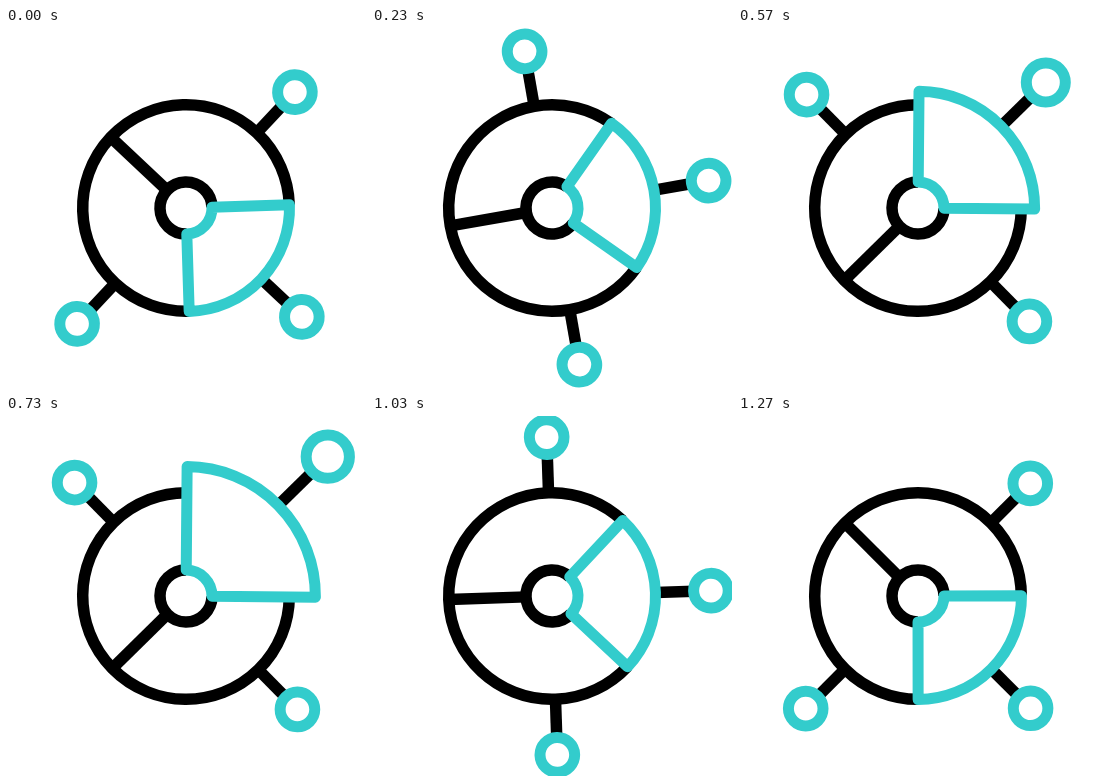
Recreate the animation shown at these times as an HTML page. Size 360 px wide and 360 px high, loop 1.67 s.

```html
<!DOCTYPE html>
<html lang="en">
<head>
<meta charset="utf-8">
<title>Rotating chart</title>
<style>
  html, body { margin: 0; width: 100%; height: 100%; overflow: hidden; background: #fff; }
  svg { display: block; width: 100vw; height: 100vh; }
  path, line, circle { fill: none; stroke: #000; stroke-width: 11.5; }
  .accent { stroke: #33cccc; stroke-width: 11; stroke-linejoin: round; }
</style>
</head>
<body>
<svg viewBox="0 0 360 360">
  <defs>
    <line id="stick" x1="104" x2="142"/>
    <circle id="ring" class="accent" cx="159" r="17.3"/>
  </defs>
  <g id="chart" transform="translate(180 180)">
    <path d="M0 103.3A103.3 103.3 0 1 1 103.3 0M0 26A26 26 0 1 1 26 0"/>
    <line x1="26" x2="103.3" transform="rotate(225)"/>
    <g transform="rotate(-45)"><use href="#stick"/><use href="#ring"/></g>
    <g transform="rotate(135)"><use href="#stick"/><use href="#ring"/></g>
    <g transform="rotate(45)">
      <line id="arm"/>
      <circle id="knob" class="accent"/>
    </g>
    <path id="slice" class="accent"/>
  </g>
</svg>
<script>
  const LOOP = 1670, STEP = 100 / 3, LAST = 38;
  const INNER = 26, OUTER = 103.5, GROWTH = 0.26, TURN = -89.5;
  const $ = id => document.getElementById(id);
  const chart = $('chart'), arm = $('arm'), knob = $('knob'), slice = $('slice');

  function setAttrs(el, attrs) {
    for (const name in attrs) el.setAttribute(name, attrs[name]);
  }

  // cubic-bezier(.42, 0, .58, 1)
  function ease(x) {
    if (x <= 0) return 0;
    if (x >= 1) return 1;
    let lo = 0, hi = 1, s;
    for (let i = 0; i < 24; i++) {
      s = (lo + hi) / 2;
      const bx = 1.26 * s * (1 - s) ** 2 + 1.74 * s * s * (1 - s) + s ** 3;
      if (bx < x) lo = s; else hi = s;
    }
    return s * s * (3 - 2 * s);
  }

  const tween = (n, start, length) => ease((n - start) / length);

  function draw(now) {
    // The clock ticks 30 times a second, on 10 ms boundaries, then rests.
    const t = Math.floor((now % LOOP) / 10) * 10;
    const n = Math.min(LAST, Math.floor((t + 4) / STEP));

    const angle = TURN * (tween(n, -1.5, 15) - tween(n, 24.1, 14.2));
    const k = 1 + GROWTH * (tween(n, 13.3, 7.5) - tween(n, 21, 7.3));
    const r = OUTER * k;

    setAttrs(chart, { transform: `translate(180 180) rotate(${angle})` });
    setAttrs(arm, { x1: 104 * k, x2: 142 * k });
    setAttrs(knob, { cx: 159 * k, r: 17.3 * k });
    setAttrs(slice, {
      d: `M${INNER} 0L${r} 0A${r} ${r} 0 0 1 0 ${r}L0 ${INNER}A${INNER} ${INNER} 0 0 0 ${INNER} 0Z`
    });
    requestAnimationFrame(draw);
  }
  draw(performance.now());
</script>
</body>
</html>
```
